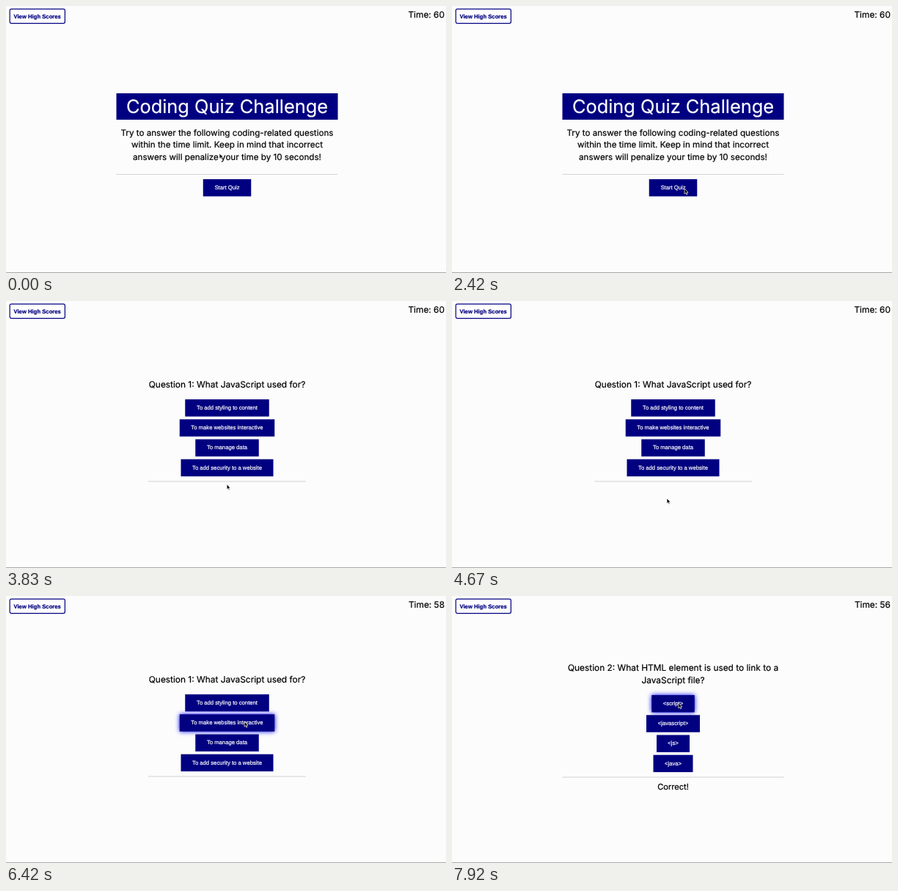
Write an HTML page that moves like this. It is 600 px wide and 364 px high and loops after 8 s.

```html
<!DOCTYPE html>
<html lang="en">
<head>
<meta charset="utf-8">
<title>Coding Quiz</title>
<style>
  html, body { margin: 0; width: 100%; height: 100%; overflow: hidden; background: #fcfcfc; }
  svg { display: block; width: 600px; height: 364px; }
  text { font: 11.65px Inter, sans-serif; font-optical-sizing: none; text-anchor: middle;
         text-rendering: geometricPrecision; stroke: #000; stroke-width: .2; }
  .title { font-size: 25.4px; fill: #fff; stroke: #fff; }
  .question { font-size: 11.9px; }
  .verdict { font-size: 11.1px; }
  .timer { font-size: 11.9px; text-anchor: end; }
  .label { font: 7.7px "Liberation Sans", Arial, sans-serif; fill: #fff; stroke: #fff; }
  .scores { font-weight: bold; fill: navy; stroke: navy; }
  .glow { fill: blue; filter: blur(3px); }
</style>
</head>
<body>
<svg id="stage" viewBox="0 0 600 364"></svg>
<script>
const FRAMES = 96, FRAME_MS = 8000 / FRAMES;
const QUESTION_1 = 46, QUESTION_2 = 79, HOVER_READY = 37;
const CENTER = 301.5, BUTTON_HEIGHT = 23.4, BUTTON_PITCH = 27.2;
const stage = document.getElementById("stage");

function add(parent, tag, attributes = {}, content = "") {
  const node = document.createElementNS("http://www.w3.org/2000/svg", tag);
  for (const name in attributes) node.setAttribute(name, attributes[name]);
  node.textContent = content;
  return parent.appendChild(node);
}

const write = (parent, content, x, y, kind = "") =>
  add(parent, "text", { x, y, class: kind }, content);

const box = (parent, x, y, width, height, extra) =>
  add(parent, "rect", { x, y, width, height, fill: "navy", ...extra });

const rule = (parent, y, width) =>
  box(parent, CENTER - width / 2, y, width, 1, { fill: "#d4d4d4" });

function button(parent, label, width, y) {
  const x = CENTER - width / 2;
  const glow = box(parent, x, y, width, BUTTON_HEIGHT, { class: "glow" });
  box(parent, x, y, width, BUTTON_HEIGHT);
  write(parent, label, CENTER, y + 13.9, "label");
  return { x, y, width, glow };
}

const buttonList = (parent, top, items) =>
  items.map(([label, width], i) => button(parent, label, width, top + i * BUTTON_PITCH));

function makeScreen(build) {
  const group = add(stage, "g");
  return { group, buttons: build(group) };
}

// Shared header and window edge
box(stage, 0, 363, 600, 1, { fill: "#aaa" });
box(stage, 5.2, 4.2, 75.2, 19.4, { rx: 2, fill: "#fff", stroke: "navy", "stroke-width": 1.2 });
write(stage, "View High Scores", 42.7, 16.5, "label scores");
const timer = write(stage, "", 598, 16.3, "timer");

const screens = [
  makeScreen(g => {
    box(g, 150.5, 119, 302, 36);
    write(g, "Coding Quiz Challenge", CENTER, 145.5, "title");
    write(g, "Try to answer the following coding-related questions", CENTER, 176.9);
    write(g, "within the time limit. Keep in mind that incorrect", CENTER, 193.4);
    write(g, "answers will penalize your time by 10 seconds!", CENTER, 209.9);
    rule(g, 229, 302);
    return buttonList(g, 236.1, [["Start Quiz", 65.5]]);
  }),
  makeScreen(g => {
    write(g, "Question 1: What JavaScript used for?", CENTER, 117.5, "question");
    rule(g, 245.5, 215);
    return buttonList(g, 134.1, [
      ["To add styling to content", 114.5],
      ["To make websites interactive", 129.5],
      ["To manage data", 86.5],
      ["To add security to a website", 126],
    ]);
  }),
  makeScreen(g => {
    write(g, "Question 2: What HTML element is used to link to a", CENTER, 101.5, "question");
    write(g, "JavaScript file?", CENTER, 118.7, "question");
    rule(g, 246.5, 302);
    write(g, "Correct!", CENTER, 263.7, "verdict");
    return buttonList(g, 135.1, [
      ["<script>", 58.5],
      ["<javascript>", 73],
      ["<js>", 45],
      ["<java>", 54],
    ]);
  }),
];

const cursor = add(stage, "path", {
  d: "M0 0V7.2L1.7 5.7 2.8 8.2 4 7.7 2.9 5.2H5Z",
  stroke: "#fff", "stroke-width": .7,
});

// Pointer stops: frame, x, y
const stops = [
  [0, 291, 201], [10, 305, 242], [17, 315, 246], [20, 315, 246], [22, 317, 249],
  [29, 317, 249], [35, 312, 249], [45, 301.5, 249], [53, 293, 268], [55, 293, 268],
  [56, 293, 269], [59, 293, 269], [70, 328, 150], [77, 325, 171], [84, 325, 171],
  [94, 309, 146], [96, 308.5, 145.5],
];

function pointerAt(frame) {
  const next = stops.findIndex(stop => stop[0] > frame);
  const [start, x0, y0] = stops[next - 1], [end, x1, y1] = stops[next];
  const u = (frame - start) / (end - start), eased = u * u * (3 - 2 * u);
  return [x0 + (x1 - x0) * eased, y0 + (y1 - y0) * eased];
}

function render(now) {
  const frame = Math.floor((now + 4) / FRAME_MS) % FRAMES;
  const current = frame < QUESTION_1 ? 0 : frame < QUESTION_2 ? 1 : 2;
  const [px, py] = pointerAt(frame);

  screens.forEach(({ group, buttons }, i) => {
    group.style.display = i === current ? "" : "none";
    for (const { x, y, width, glow } of buttons) {
      const hovered = frame >= HOVER_READY &&
        px >= x && px <= x + width && py >= y && py <= y + BUTTON_HEIGHT;
      glow.style.display = hovered ? "" : "none";
    }
  });
  timer.textContent = "Time: " + (60 - Math.max(0, Math.floor((frame - QUESTION_1) / 12)));
  cursor.setAttribute("transform", `translate(${px} ${py})`);
}

const began = performance.now();
function tick() {
  render(performance.now() - began);
  requestAnimationFrame(tick);
}
tick();
</script>
</body>
</html>
```
